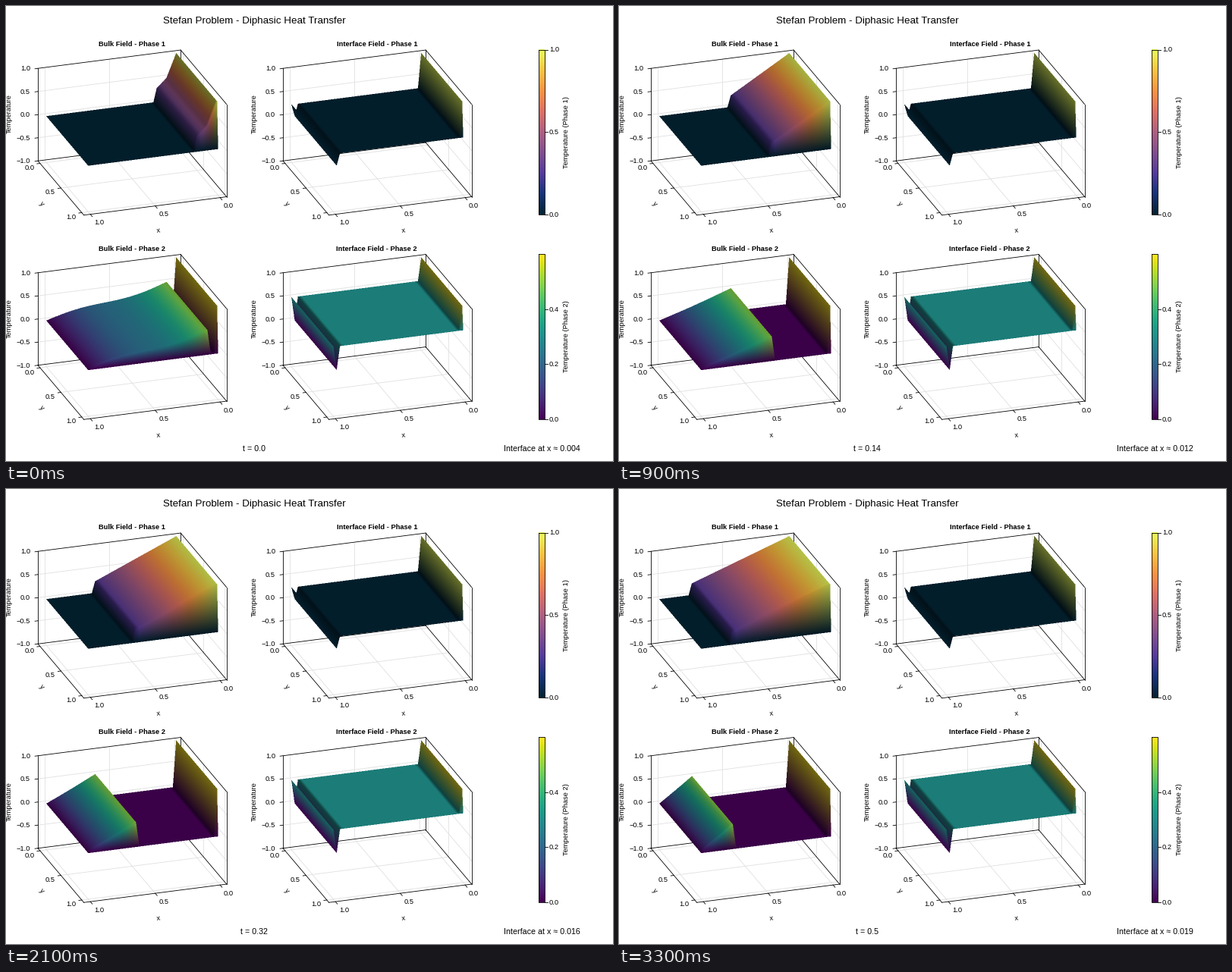
Recreate the animation shown at these times as a matplotlib script. Size 800x600 px, loop 3400 ms.

```python
import numpy as np
import matplotlib.pyplot as plt
from matplotlib.animation import FuncAnimation
from matplotlib.colors import LinearSegmentedColormap

plt.rcParams["font.family"] = "Liberation Sans"
W, H, DPI = 800, 600, 100
FRAMES, T_END = 34, 0.5
CELLS = 40
H_GRID = 1 / CELLS
DX, DY = 323, 269.5          # spacing between panels
SPACING = 0.4                # pixels between surface samples

# Screen vectors (pixels) of the orthographic view
ORIGIN = np.array([224.4, 123.4])
EX, EY, EZ = np.array([-171, 22]), np.array([55, 65]), np.array([0, -61])

# Eye-space axis directions, axis lengths and light for shading
AXES = np.array([[-0.952, -0.122, 0.281], [0.306, -0.362, 0.880], [0, 0.924, 0.383]])
LENGTHS = np.array([179.6, 179.6, 66])
LIGHT = np.array([0.457, 0.629, 0.629])

THERMAL = LinearSegmentedColormap.from_list("thermal", np.array([
    (4, 35, 51), (23, 51, 122), (85, 59, 157), (129, 79, 143), (175, 95, 130),
    (222, 112, 101), (249, 146, 66), (249, 196, 65), (232, 250, 91)]) / 255)
VIRIDIS = plt.get_cmap("viridis")

grid = np.linspace(0, 1, CELLS + 1)

fig = plt.figure(figsize=(W / DPI, H / DPI), dpi=DPI, facecolor="white")
ax = fig.add_axes([0, 0, 1, 1])
ax.axis("off")


def project(x, y, z, shift=(0, 0)):
    return [ORIGIN[i] + shift[i] + x * EX[i] + y * EY[i] + z * EZ[i] for i in (0, 1)]


def text(x, y, s, px=9.33, **kw):
    kw = {"ha": "center", "va": "center", **kw}
    return ax.text(x, y, s, fontsize=px * 72 / DPI, **kw)


def line(p, q, shift, color="black", z=1):
    a, b = project(*p, shift), project(*q, shift)
    ax.plot([a[0], b[0]], [a[1], b[1]], color=color, lw=0.6, zorder=z)


def tick(x, y, d):
    n = 4 * d / np.hypot(*d)
    ax.plot([x, x + n[0]], [y, y + n[1]], color="black", lw=0.6)


def draw_axes(shift, title):
    lo, hi = -0.05, 1.05
    for v in (0, 0.5, 1):
        for p, q in (((v, lo, -1), (v, hi, -1)), ((v, lo, -1), (v, lo, 1)),
                     ((lo, v, -1), (hi, v, -1)), ((lo, v, -1), (lo, v, 1))):
            line(p, q, shift, "#e0e0e0", 0.5)
    for v in (-0.5, 0, 0.5):
        line((lo, lo, v), (hi, lo, v), shift, "#e0e0e0", 0.5)
        line((lo, lo, v), (lo, hi, v), shift, "#e0e0e0", 0.5)
    for y, z in ((hi, -1), (lo, -1), (lo, 1)):
        line((lo, y, z), (hi, y, z), shift)
    for x, z in ((hi, -1), (lo, -1), (lo, 1)):
        line((x, lo, z), (x, hi, z), shift)
    for x, y in ((hi, lo), (lo, lo), (lo, hi)):
        line((x, y, -1), (x, y, 1), shift)

    for v in (0, 0.5, 1):
        x, y = project(v, hi, -1, shift)
        tick(x, y, EY)
        text(x + 11.3, y + 11.3, f"{v:.1f}")
        x, y = project(hi, v, -1, shift)
        tick(x, y, EX)
        text(x - 14, y + 6, f"{v:.1f}")
    for v in (-1, -0.5, 0, 0.5, 1):
        x, y = project(hi, lo, v, shift)
        tick(x, y, EX)
        text(x - 10, y + 0.3, f"{v:.1f}".replace("-", "\u2212"), ha="right")

    sx, sy = shift
    text(201 + sx, 296.5 + sy, "x", rotation=7.3)
    text(46.5 + sx, 260.5 + sy, "y", rotation=-49.8)
    text(4.2 + sx, 142.5 + sy, "Temperature", rotation=90)
    text(165.8 + sx, 50.8 + sy, title, weight="bold")


def draw_colorbar(top, cmap, vmax, ticks, label):
    x0, x1, height = 702, 710, 217.5
    bottom = top + height
    ax.imshow(np.linspace(1, 0, 256)[:, None], cmap=cmap, aspect="auto",
              extent=(x0, x1, bottom, top), interpolation="bilinear")
    ax.plot([x0, x1, x1, x0, x0], [top, top, bottom, bottom, top], "k", lw=0.6)
    for v in ticks:
        y = bottom - height * v / vmax
        ax.plot([x1, x1 + 4], [y, y], "k", lw=0.6)
        text(716, y + 0.3, f"{v:.1f}", ha="left")
    text(738.5, top + height / 2, label, rotation=90)


def sample_cells(z, axis, vec):
    """Fractional cell positions along an axis, denser where z is steep."""
    rise = abs(EZ[1]) * abs(np.diff(z, axis=axis)).max(axis=1 - axis)
    counts = np.ceil((rise + np.hypot(*vec) * H_GRID) / SPACING).astype(int)
    parts = [i + np.arange(k) / k for i, k in enumerate(counts)]
    return np.concatenate(parts + [[CELLS - 1e-9]])


def refine(a, p, axis):
    i = p.astype(int)
    f = (p - i).astype(np.float32).reshape((-1, 1, 1) if axis == 0 else (1, -1, 1))
    low, high = np.take(a, i, axis), np.take(a, i + 1, axis)
    return low + (high - low) * f


def draw_surface(canvas, z, shift, cmap, vmin, vmax):
    """Paint a shaded height field back to front at twice the stage's size."""
    zx, zy = np.gradient(z, H_GRID)
    n = np.stack([-zx, -zy, np.ones_like(z)], axis=-1) / LENGTHS
    n /= np.linalg.norm(n, axis=-1, keepdims=True)
    shade = 0.45 + 0.5 * np.clip(n @ (AXES @ LIGHT), 0, None)
    rgb = cmap(np.clip((z - vmin) / (vmax - vmin), 0, 1))[..., :3] * shade[..., None]

    px, py = sample_cells(z, 0, EX), sample_cells(z, 1, EY)
    data = np.concatenate([rgb, np.ones_like(z)[..., None], z[..., None]], axis=-1)
    data = refine(refine(data.astype(np.float32), px, 0), py, 1)
    sx, sy = project(px[:, None] * H_GRID, py * H_GRID, data[..., 4], shift)
    canvas[(2 * sy).astype(int), (2 * sx).astype(int)] = data[..., :4]


def shrink(canvas):
    """Average 2 x 2 samples into smooth-edged RGBA pixels."""
    c = (canvas[::2, ::2] + canvas[1::2, ::2] + canvas[::2, 1::2] + canvas[1::2, 1::2]) / 4
    c[..., :3] /= np.maximum(c[..., 3:], 0.25)
    return np.clip(c, 0, 1)


def front(t):
    return 0.764 * (max(t + 0.012, 0.0025) / 0.512) ** 0.4


def snap(s):
    return np.floor(s / H_GRID + 1e-9) * H_GRID


def extrude(profile):
    z = np.repeat(profile[:, None], grid.size, axis=1)
    z[:, -1] = 0
    return z


def bulk_1(n, t):
    r = snap(front(t))
    u = grid / r
    k = np.exp(-1.5 * n)
    z = 1 - (0.75 - 0.05 * k) * u - 0.16 * k * (1 - abs(2 * u - 1))
    return extrude(np.where(grid <= r + 1e-6, z, 0))


def bulk_2(n, t):
    r = snap(front(t - T_END / (FRAMES - 1)) + 0.005)
    v = (1 - grid) / (1 - r)
    wave = 0.05 * np.exp(-n / 2) * np.sin(2 * np.pi * v)
    sag = 0.022 * np.exp(-n / 20) * np.sin(np.pi * v)
    z = np.where(grid >= r - 1e-6, 0.5 * v + wave - sag, 0)
    z[0] = 1
    return extrude(z)


def interface(level):
    z = np.full((grid.size, grid.size), level)
    z[0, :-1] = 1
    z[-2] = 0
    return z


for row in (0, 1):
    for col, kind in enumerate(("Bulk", "Interface")):
        draw_axes((col * DX, row * DY), f"{kind} Field - Phase {row + 1}")
draw_colorbar(57.7, THERMAL, 1, (0, 0.5, 1), "Temperature (Phase 1)")
draw_colorbar(327.2, VIRIDIS, 0.6, (0, 0.2, 0.4), "Temperature (Phase 2)")

base = np.zeros((2 * H, 2 * W, 4), np.float32)
draw_surface(base, interface(0.25), (DX, 0), THERMAL, 0.25, 1)
draw_surface(base, interface(0.5), (DX, DY), VIRIDIS, 0, 1)
surfaces = ax.imshow(shrink(base), extent=(0, W, H, 0), aspect="auto",
                     interpolation="nearest", zorder=2)
ax.set(xlim=(0, W), ylim=(H, 0))

text(327, 19.6, "Stefan Problem - Diphasic Heat Transfer", 13.33)
time_text = text(327, 584, "", 10.67)
front_text = text(706.5, 584, "", 10.67)


def update(n):
    t = T_END * n / (FRAMES - 1)
    canvas = base.copy()
    draw_surface(canvas, bulk_1(n, t), (0, 0), THERMAL, 0, 1)
    draw_surface(canvas, bulk_2(n, t), (0, DY), VIRIDIS, 0, 0.6)
    surfaces.set_data(shrink(canvas))
    time_text.set_text(f"t = {round(t, 2)}")
    front_text.set_text(f"Interface at x \u2248 {front(t) * H_GRID:.3f}")
    return surfaces, time_text, front_text


anim = FuncAnimation(fig, update, frames=FRAMES, interval=100, repeat=True,
                     repeat_delay=0, init_func=lambda: update(0))
plt.show()
```
